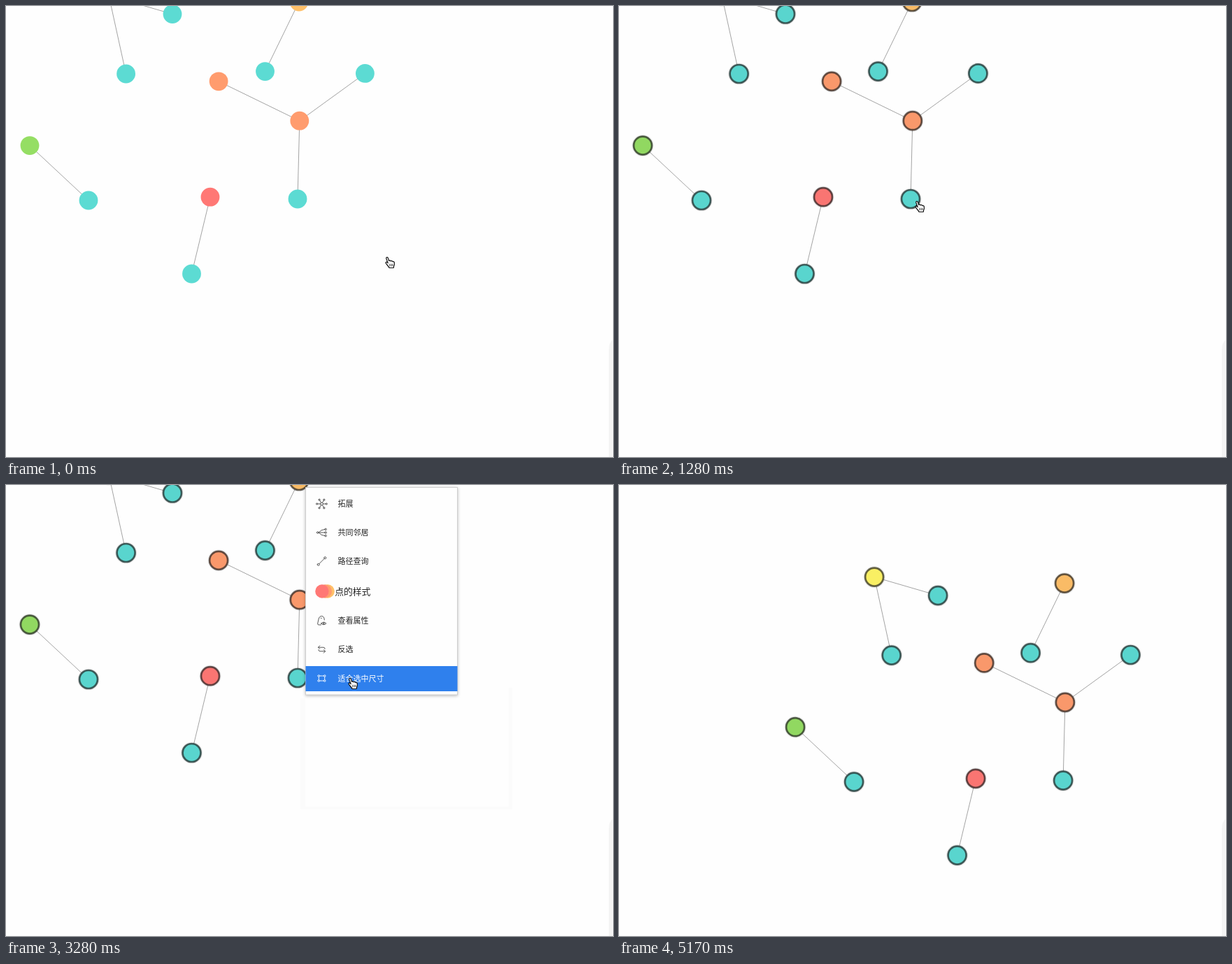
Recreate the animation shown at these times as an HTML page. Size 868 by 645 pixels, loop 6.15 s.

```html
<!DOCTYPE html>
<html lang="zh">
<head>
<meta charset="utf-8">
<title>Graph menu</title>
<style>
  html, body { margin: 0; width: 100%; height: 100%; overflow: hidden; background: #fefefe; }
  svg { display: block; width: 868px; height: 645px; }
  text { font: 11px "Noto Sans CJK SC", "Noto Sans CJK", sans-serif; fill: #222; }
  .big { font-size: 12.8px; }
  .edge { stroke: #999; stroke-width: .9; }
  .box { fill: #fefefe; stroke: #cfcfcf; stroke-width: 1; filter: drop-shadow(0 1px 2px rgba(0,0,0,.28)); }
  .icon { fill: none; stroke: #444; stroke-width: .9; stroke-linecap: round; stroke-linejoin: round; }
  .hot text { fill: #fff; }
  .hot .icon { stroke: #fff; }
</style>
</head>
<body>
<svg id="stage" viewBox="0 0 868 645">
  <path d="M867 478Q862 482 862 492V645H867Z" fill="#f4f4f4"/>
  <g id="ghost">
    <path d="M421 305H428V460H719V290H724V463.5H421Z" fill="#fbfbfb"/>
  </g>
  <g id="graph"></g>
  <rect id="panel" x="428" y="279" width="291" height="181" fill="#fcfcfc"/>
  <g id="menu">
    <rect class="box" x="428.5" y="3.5" width="217" height="296.5"/>
    <rect id="bar" x="428.5" y="259" width="217" height="36" fill="#2f80ed"/>
  </g>
  <g id="cursor" stroke-linejoin="round">
    <g id="hand" fill="#fff" stroke="#111" stroke-width="1.2" stroke-linecap="round">
      <path d="M-5.3-6C-5.6-8-3.3-8.3-2.8-6.7L-1.3-2.5C-.8-3.5 1-3.4 1.4-2C2-2.9 3.4-2.6 3.9-1.3C4.7-1.9 6.1-1.4 6.3 0C6.8 2.2 6.3 4 5.5 5.4L5.3 7.3L-1 7.5C-1.5 5.8-4 3.6-5.8.9C-6.7-.8-4.6-1.5-3.4 0L-2.8.6Z"/>
      <path d="M-.2 2.2V5M2 2.2V5M4 2.2V4.8" stroke-width=".8"/>
    </g>
    <path id="arrow" transform="translate(-2 -8)" d="M0 0V13L3 10.2L5.2 15L7.4 14L5.2 9.5L9.3 9.2Z" fill="#111" stroke="#fff" stroke-width="1"/>
  </g>
</svg>
<script>
const LOOP = 6150;
const $ = id => document.getElementById(id);

function add(parent, tag, attrs, text) {
  const el = document.createElementNS('http://www.w3.org/2000/svg', tag);
  for (const k in attrs) el.setAttribute(k, attrs[k]);
  if (text) el.textContent = text;
  parent.appendChild(el);
  return el;
}

// Graph
const C = { teal: '#5cdbd3', orange: '#ff9c6e', red: '#ff7875', yellow: '#fff566', gold: '#ffc069', green: '#95de64' };
const nodes = [
  ['yellow', 147, -15], ['teal', 238, 11.5], ['teal', 171.6, 97],
  ['gold', 419, -6], ['teal', 370.5, 93.6],
  ['orange', 304.1, 107.8], ['orange', 419.8, 164.2], ['teal', 513.4, 96.4], ['teal', 417, 276],
  ['green', 34, 199.6], ['teal', 118, 278],
  ['red', 292, 273.2], ['teal', 265.5, 383]
];
const links = [[0, 1], [0, 2], [3, 4], [5, 6], [6, 7], [6, 8], [9, 10], [11, 12]];
const graph = $('graph');
for (const [a, b] of links) {
  const [, x1, y1] = nodes[a], [, x2, y2] = nodes[b];
  add(graph, 'line', { class: 'edge', x1, y1, x2, y2 });
}
const rings = nodes.map(([name, cx, cy]) => {
  const halo = add(graph, 'circle', { cx, cy, r: 15.6, fill: '#000', opacity: .08 });
  const disc = add(graph, 'circle', { cx, cy, fill: C[name] });
  const ring = add(graph, 'circle', { cx, cy, r: 13, fill: 'rgba(0,0,0,.025)', stroke: 'rgba(40,40,40,.72)', 'stroke-width': 2.7 });
  return { halo, disc, ring };
});

// Context menu; each icon is centred on 0,0
const dot = (x, y, r = 1.3) => `M${x - r} ${y}a${r} ${r} 0 1 0 ${2 * r} 0a${r} ${r} 0 1 0 ${-2 * r} 0`;
const spokes = [0, 60, 120, 180, 240, 300].map(a => {
  const c = Math.cos(a * Math.PI / 180), s = Math.sin(a * Math.PI / 180);
  return `M${2 * c} ${2 * s}L${5.6 * c} ${5.6 * s}` + dot(6.8 * c, 6.8 * s, 1.1);
}).join('');
const items = [
  [27, '拓展', dot(0, 0, 1.9) + spokes],
  [68, '共同邻居', dot(-5.8, 0) + dot(5.6, -4.6) + dot(5.6, 0) + dot(5.6, 4.6) + 'M-4.5 0H4.3M-4.5 0Q-1-4.4 4.3-4.6M-4.5 0Q-1 4.4 4.3 4.6'],
  [109, '路径查询', dot(-4.8, 4.8, 1.5) + dot(4.8, -4.8, 1.5) + 'M-3.7 3.7L3.7-3.7'],
  [152, '点的样式', ''],
  [194, '查看属性', 'M-1 6H-4.5Q-6 6-5.8 4L-4.5-2Q-3.5-6.5 0-6.5Q3.5-6.5 3.8-1M-1.3-3.6H-.3M-.8 4Q2.8 .2 6.4 4Q2.8 7.6-.8 4Z' + dot(2.8, 4, 1)],
  [235, '反选', 'M-2.8-5.2L-5-2.8L-2.8-.6M-5-2.8H2.5Q4.6-2.8 4.6-.6M2.8 5.2L5 2.8L2.8 .6M5 2.8H-2.5Q-4.6 2.8-4.6 .6'],
  [276.5, '适合选中尺寸', dot(-4.2, -3.5) + dot(4.2, -3.5) + dot(-4.2, 3.5) + dot(4.2, 3.5) + 'M-2.8-3.5H2.8M-2.8 3.5H2.8M-4.2-2.1V2.1M4.2-2.1V2.1']
];
const menu = $('menu');
let last;
for (const [y, label, d] of items) {
  last = add(menu, 'g', { transform: `translate(451.5 ${y})` });
  if (d) add(last, 'path', { class: 'icon', d });
  else [[8.6, C.gold], [4.8, C.orange], [.4, C.red]].forEach(([cx, fill]) => add(last, 'circle', { cx, cy: 0, r: 9.7, fill }));
  add(last, 'text', d ? { x: 23, y: 4 } : { class: 'big', x: 18.7, y: 4.6 }, label);
}

// Pointer path: time, x, y
const path = [
  [0, 549, 367], [40, 549, 367], [150, 512, 340], [570, 512, 340], [1190, 437, 293],
  [1280, 430, 287], [2550, 430, 287], [2830, 496.5, 285], [3270, 496.5, 285], [3280, 496, 284],
  [4280, 496, 284], [4290, 496.5, 286], [4335, 497, 286.5], [4520, 766, 565],
  [4910, 766, 565], [5170, 809, 660], [LOOP, 809, 660]
];
function pointer(t) {
  let i = 1;
  while (i < path.length - 1 && t >= path[i][0]) i++;
  const [t0, x0, y0] = path[i - 1], [t1, x1, y1] = path[i];
  const p = (t - t0) / (t1 - t0), e = p * p * (3 - 2 * p);
  return [x0 + (x1 - x0) * e, y0 + (y1 - y0) * e];
}

const show = (el, on) => el.style.display = on ? '' : 'none';
const within = (t, a, b) => t >= a && t < b;

function draw(t) {
  const picked = t >= 570;
  for (const { halo, disc, ring } of rings) {
    show(halo, picked);
    show(ring, picked);
    disc.setAttribute('r', picked ? 13.8 : 13.4);
  }
  graph.setAttribute('transform', t >= 3510 ? 'translate(218.1 146.6)' : '');

  show($('ghost'), within(t, 1400, 3510));
  show($('panel'), within(t, 1310, 1970));
  $('panel').setAttribute('opacity', Math.min(1, (t - 1310) / 90));

  const hot = within(t, 2590, 3510);
  show(menu, within(t, 2110, 3510));
  menu.setAttribute('opacity', t < 2140 ? .5 : 1);
  show($('bar'), hot);
  last.setAttribute('class', hot ? 'hot' : '');

  const arrow = within(t, 1400, 2590), [x, y] = pointer(t);
  show($('arrow'), arrow);
  show($('hand'), !arrow);
  $('cursor').setAttribute('transform', `translate(${x} ${y})`);
}

const start = performance.now();
function tick() {
  draw((performance.now() - start) % LOOP);
  requestAnimationFrame(tick);
}
tick();
</script>
</body>
</html>
```
